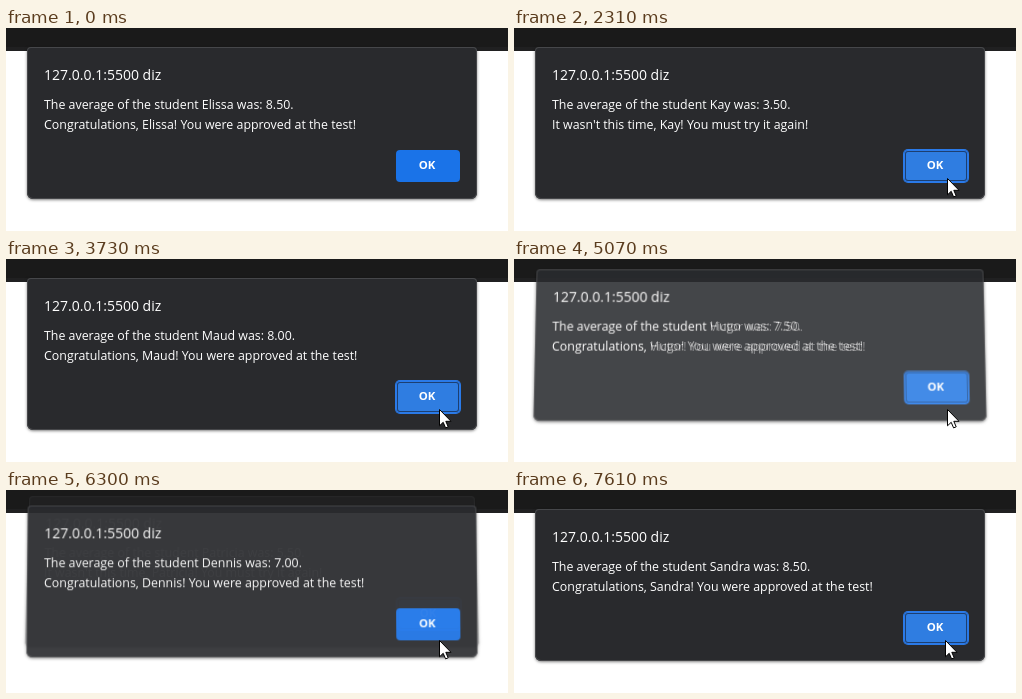
Animation of 502x203 px, one loop 8 s. Source, as an HTML page:

```html
<!DOCTYPE html>
<html lang="en">
<head>
<meta charset="utf-8">
<title>Student averages</title>
<style>
  html, body { margin: 0; width: 100%; height: 100%; overflow: hidden; background: #fff; }
  #stage { position: absolute; left: 0; top: 0; width: 502px; height: 203px; overflow: hidden;
    background: #fff; font-family: "Open Sans", "Noto Sans", sans-serif; }
  #bar { position: absolute; left: 0; top: 0; width: 502px; height: 23px; box-sizing: border-box;
    background: #1a1a1a; border-bottom: 4px solid #202021; }
  .dialog { position: absolute; left: 21px; top: 19px; width: 450px; height: 152px; box-sizing: border-box;
    background: #292a2d; border-radius: 4px 4px 6px 6px; color: #fff;
    box-shadow: inset 0 0 0 1px #46474a, 0 1px 3px rgba(0, 0, 0, .5); }
  .dialog div { position: absolute; left: 17px; line-height: 20px; white-space: pre; }
  .dialog .title { top: 18px; font-size: 14px; }
  .dialog .line1 { top: 48px; font-size: 12.38px; }
  .dialog .line2 { top: 68px; font-size: 12.38px; }
  .dialog .ok { left: 369px; top: 103px; width: 64px; height: 32px; line-height: 30px; border-radius: 4px;
    background: #1a73e8; font-size: 11.4px; font-weight: 700; text-align: center; text-indent: -2px; }
  .dialog .ok.hover { background: #2f7de1;
    box-shadow: inset 0 0 0 1px #2a7ae8, inset 0 0 0 2px #1d3f70, 0 0 0 1px #2a7ae8; }
  #cursor { position: absolute; left: 0; top: 0; overflow: visible; }
</style>
</head>
<body>
<div id="stage">
  <div id="bar"></div>
  <svg id="cursor" width="14" height="21">
    <path d="M.5 .5V16.8L4.2 13.3 6.6 18.9 9.2 17.8 6.8 12.3H12Z" fill="#fff" stroke="#000" stroke-width="1"/>
  </svg>
</div>
<script>
const LOOP = 8000, STEP = 70, PASS = 6;

// name, average, when the dialog starts to open, when its button lights up
const students = [
  ["Elissa", 8.5, -1000, 1010],
  ["Peter", 7, 1150, 1430],
  ["Kay", 3.5, 2030, 2310],
  ["Martin", 6.5, 2510, 2720],
  ["Bruno", 9, 2980, 3260],
  ["Maud", 8, 3520, 3730],
  ["Hugo", 7.5, 4590, 4800],
  ["Victor", 7.5, 5000, 5280],
  ["Bianca", 8.5, 5480, 5690],
  ["Patricia", 5.5, 5890, 6030],
  ["Dennis", 7, 6160, 6440],
  ["Gabrielle", 8, 6660, 6790],
  ["Oscar", 6, 6970, 7250],
  ["Sandra", 8.5, 7330, 7610]
].map(([name, mark, open, ready]) => ({ name, mark, open, ready }));

const stage = document.getElementById("stage");
const cursor = document.getElementById("cursor");

function makeDialog() {
  const box = document.createElement("div");
  box.className = "dialog";
  const part = {};
  for (const key of ["title", "line1", "line2", "ok"]) {
    part[key] = document.createElement("div");
    part[key].className = key;
    box.append(part[key]);
  }
  part.title.textContent = "127.0.0.1:5500 diz";
  part.ok.textContent = "OK";
  stage.insertBefore(box, cursor);
  return { box, ...part };
}

const back = makeDialog(), front = makeDialog();

function show(dialog, student, lift, alpha, hover) {
  const { name, mark } = student;
  dialog.line1.textContent = `The average of the student ${name} was: ${mark.toFixed(2)}.`;
  dialog.line2.textContent = mark >= PASS
    ? `Congratulations, ${name}! You were approved at the test!`
    : `It wasn't this time, ${name}! You must try it again!`;
  dialog.ok.classList.toggle("hover", hover);
  dialog.box.style.opacity = alpha;
  dialog.box.style.transform = lift
    ? `translateY(${-lift}px) perspective(800px) rotateX(${lift * 0.45}deg)` : "none";
}

const snap = (t, from) => from + Math.floor((t - from) / STEP) * STEP;

function drawDialogs(t) {
  let i = students.length - 1;
  while (students[i].open > t) i--;
  const now = students[i];
  const hover = t >= now.ready;
  const p = i && !hover ? Math.max(0, (snap(t, now.open) - now.ready + 290) / 200) : 1;
  const opening = p < 1;
  back.box.style.display = opening ? "" : "none";
  if (opening) {
    show(back, students[i - 1], 15 * (1 - (1 - p) ** 2), Math.max(0, 1 - 1.2 * p * p), true);
    show(front, now, 15 * (1 - p), Math.min(1, 1.42 * p ** 1.55), false);
  } else {
    show(front, now, 0, 1, hover);
  }
}

function drawCursor(t) {
  cursor.style.display = t < 590 ? "none" : "";
  const k = Math.min(1, Math.max(0, (snap(t, 590) - 520) / 560));
  const e = 1 - (1 - k) ** 2;
  const x = Math.round(472 - 39 * e) - (t >= 6440 ? 2 : 0);
  const y = Math.round(205 - 55 * e);
  cursor.style.transform = `translate(${x}px, ${y}px)`;
}

function frame() {
  const t = performance.now() % LOOP;
  drawDialogs(t);
  drawCursor(t);
  requestAnimationFrame(frame);
}
frame();
</script>
</body>
</html>
```
